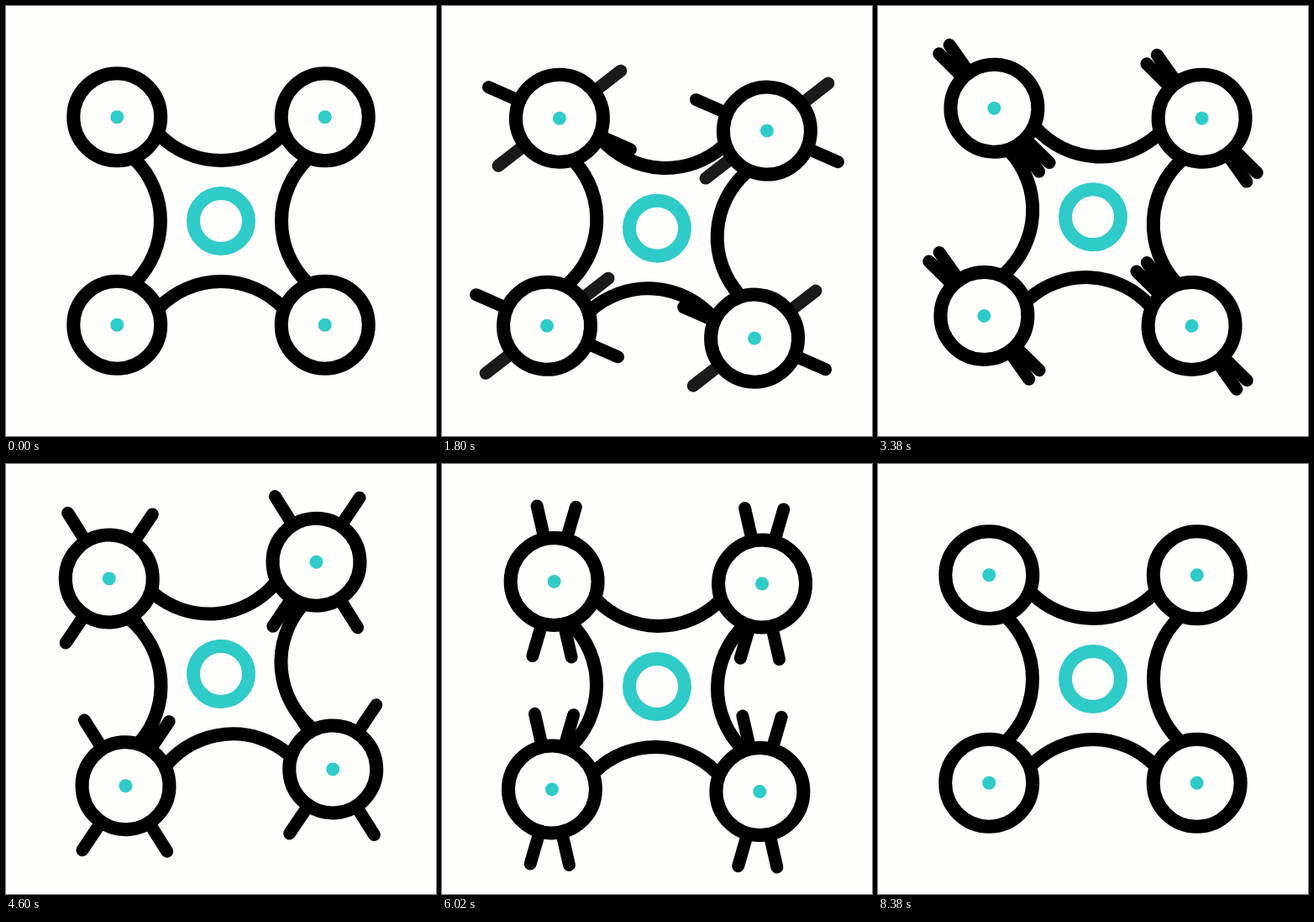
Recreate the animation shown at these times as an HTML page with a canvas. Size 512 by 512 pixels, loop 8480 ms.

```html
<!DOCTYPE html>
<html>
<head>
<meta charset="utf-8">
<style>
html, body { margin: 0; width: 100%; height: 100%; overflow: hidden; background: #fefefd; }
canvas { display: block; width: 512px; height: 512px; }
</style>
</head>
<body>
<canvas id="stage" width="512" height="512"></canvas>
<script>
const ctx = document.getElementById("stage").getContext("2d");
const PAPER = "#fefefd", INK = "#000", TEAL = "#2fcbc9";
const LOOP = 8480, STEPS = 180, ARM = 123.75, BLADE = 92.3;

const radians = deg => deg * Math.PI / 180;
const clamp = (v, max) => Math.min(max, Math.max(0, v));
const ramp = (n, from, to) => clamp((n - from) / (to - from), 1);
const smooth = p => p * p * (3 - 2 * p);

// Rest, up, down, up, rest: three eased turns between two still poses
function swing(n, size, up, down, upAgain) {
  const ease = (from, to) => smooth(ramp(n, from, to));
  return size * (ease(0, up) - 2 * ease(up, down) + 2 * ease(down, upAgain) - ease(upAgain, STEPS));
}

// Blade angles in degrees; u counts steps from mid-flight
const sway = u => Math.sin(2 * Math.PI * u / 120);
const solidSpin = u => clamp(844 + 10.36 * u - 0.0052 * u * u - 3 * sway(u), 1440);
const fadingSpin = u => 597.8 + 7.593 * u - 7 * sway(u);

// The clock runs in uneven beats: 20, 100 and 20 ms
function stepAt(ms) {
  const beat = ms % 140;
  const n = 3 * Math.floor(ms / 140) + (beat < 20 ? 0 : beat < 120 ? 1 : 2);
  return Math.min(n, STEPS - 1);
}

function circle(r, stroke, fill) {
  ctx.beginPath();
  ctx.arc(0, 0, r, 0, 2 * Math.PI);
  if (fill) { ctx.fillStyle = fill; ctx.fill(); }
  if (stroke) { ctx.strokeStyle = stroke; ctx.stroke(); }
}

function blade(deg, alpha, from, to) {
  if (alpha <= 0 || to <= from) return;
  ctx.save();
  ctx.rotate(radians(deg));
  ctx.globalAlpha = alpha;
  ctx.lineWidth = 15;
  ctx.lineCap = "round";
  ctx.beginPath();
  ctx.moveTo(BLADE * (2 * from - 1), 0);
  ctx.lineTo(BLADE * (2 * to - 1), 0);
  ctx.stroke();
  ctx.restore();
}

function eachRotor(paint) {
  for (const x of [-ARM, ARM]) for (const y of [-ARM, ARM]) {
    ctx.save();
    ctx.translate(x, y);
    paint();
    ctx.restore();
  }
}

function draw(n) {
  const u = n - 98;
  const tilt = swing(n, 4.95, 60, 103, 151);
  ctx.setTransform(1, 0, 0, 1, 0, 0);
  ctx.fillStyle = PAPER;
  ctx.fillRect(0, 0, 512, 512);
  ctx.translate(256, 256 + swing(n, 9, 43, 87, 130));
  ctx.rotate(radians(tilt));
  ctx.strokeStyle = INK;
  ctx.lineWidth = 16;

  eachRotor(() => {
    blade(fadingSpin(u) - tilt, ramp(n, 12, 41) * (1 - ramp(n, 147, 175)), 0, 1);
    blade(solidSpin(u) - tilt, 1, ramp(n, 158, 178), ramp(n, 0, 19));
  });

  for (let side = 0; side < 4; side++) {
    ctx.beginPath();
    ctx.arc(0, -175, 103, radians(45), radians(135));
    ctx.stroke();
    ctx.rotate(Math.PI / 2);
  }

  eachRotor(() => {
    circle(52, INK, PAPER);
    circle(8, null, TEAL);
  });
  circle(33, TEAL);
}

function tick() {
  draw(stepAt(performance.now() % LOOP));
  requestAnimationFrame(tick);
}
tick();
</script>
</body>
</html>
```
